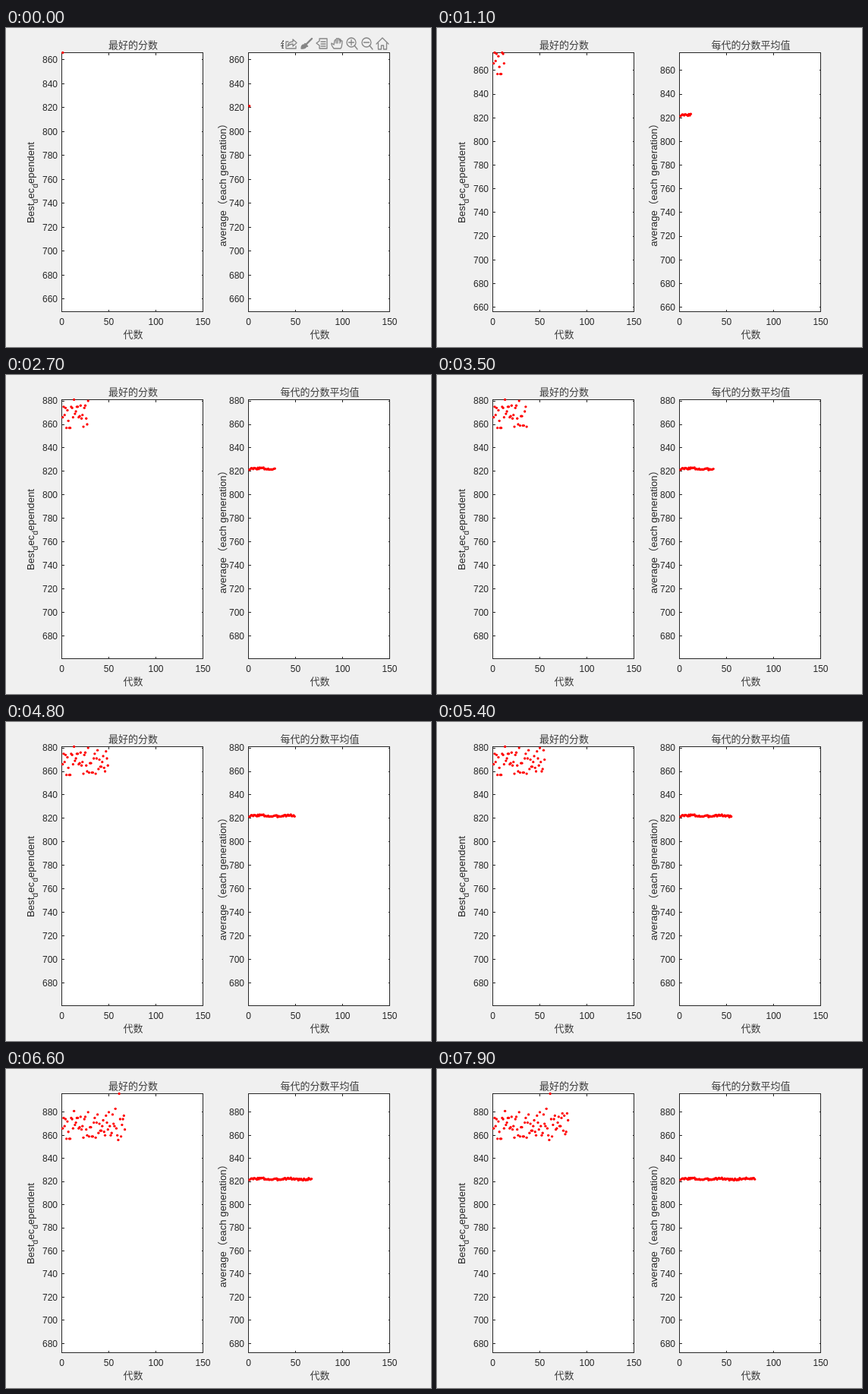
These frames come from a looping animation (560x420 px, 8 s). An HTML page:

```html
<!DOCTYPE html>
<html lang="zh">
<head>
<meta charset="utf-8">
<style>
  html, body { margin: 0; width: 100%; height: 100%; overflow: hidden; background: #f0f0f0; }
  svg { display: block; width: 560px; height: 420px; }
  text { font: 12px "Liberation Sans", "Noto Sans CJK SC", "Noto Sans CJK", sans-serif; fill: #262626; text-anchor: middle; }
  .cjk { font: 300 13px "Noto Sans CJK SC", "Noto Sans CJK", serif; fill: #3c3c3c; }
  .label { font-size: 13.2px; }
  .sub { font-size: 10.5px; }
  .tick { text-anchor: end; }
  .axis { fill: none; stroke: #262626; shape-rendering: crispEdges; }
  .icon { fill: none; stroke: #858585; stroke-width: 1.3; stroke-linejoin: round; stroke-linecap: round; }
</style>
</head>
<body>
<svg id="stage" viewBox="0 0 560 420">
  <g id="plots"></g>
  <g id="toolbar">
    <rect x="366" y="12" width="141" height="18" fill="#f0f0f0"/>
    <g class="icon">
      <path d="M372 18h-3v9h13v-3M371 24q1-6 7-6v-3l5 4.500-5 4.500v-3q-4 0-7 3"/>
      <path d="M403 14l-8 8M394 21l3 3" stroke-width="2.4"/>
      <path d="M393 22q-4 0-4 5 5 1 7-3z" fill="#858585"/>
      <path d="M413 14h10v13h-10v-4l-4-3 4-3zM415 18h6M415 21h6M415 24h6"/>
      <path d="M432 22l-3-2q-1 2 3 7h9q2-3 2-10-2-1-2 1v-3q-2-1-2 1v-2q-2-1-2 1v-1q-2-1-2 1v1q-2-1-2 1zM435 16v4M437 15v5M440 16v4"/>
      <path d="M459 23l4 5M451.500 19h7M455 15.500v7M479 23l4 5M471.500 19h7"/>
      <circle cx="455" cy="19" r="6"/>
      <circle cx="475" cy="19" r="6"/>
      <path d="M488 21l8-8 8 8M490.500 20v8h4v-5h3v5h4v-8"/>
    </g>
  </g>
</svg>
<script>
const LOOP = 8000, STEP = 100, TOOLBAR_END = 500;
const TOP = 32.5, HEIGHT = 341, WIDTH = 186, GENERATIONS = 150;
const COUNT = LOOP / STEP;
const LOWEST = 856, SPREAD = 24;

// Generations that set a new best score and so raise the axis limit.
const records = { 1: 866, 2: 875, 13: 881, 57: 883, 61: 896 };

function seededRandom(seed) {
  return () => {
    seed = (seed * 1664525 + 1013904223) % 4294967296;
    return seed / 4294967296;
  };
}

function makeBest() {
  const random = seededRandom(7);
  let record = 0;
  return Array.from({ length: COUNT }, (_, i) => {
    const spread = Math.min(SPREAD, record - LOWEST);
    const score = LOWEST + Math.round(random() * spread);
    if (!(i + 1 in records)) return score;
    return record = records[i + 1];
  });
}

function makeAverage() {
  const random = seededRandom(3);
  return Array.from({ length: COUNT }, (_, i) => {
    const wave = 0.5 * Math.cos((i - 11) / 30 * 2 * Math.PI);
    return 822.2 + wave + (random() - 0.5) * 1.8;
  });
}

const best = makeBest();
const panels = [
  {
    left: 73.5, labelX: 37, title: '最好的分数', data: best,
    label: 'Best<tspan class="sub" dy="5">d</tspan><tspan dy="-5">ec</tspan>' +
           '<tspan class="sub" dy="5">d</tspan><tspan dy="-5">ependent</tspan>'
  },
  {
    left: 319.5, labelX: 289.5, title: '每代的分数平均值', data: makeAverage(),
    label: 'average（each generation）'
  }
];

const plots = document.getElementById('plots');
const toolbar = document.getElementById('toolbar');

const text = (x, y, content, cls = '', extra = '') =>
  `<text x="${x}" y="${y}" class="${cls}" ${extra}>${content}</text>`;

function drawPanel({ left, labelX, title, data, label }, count, max) {
  const right = left + WIDTH, bottom = TOP + HEIGHT, min = max * 0.75;
  const center = left + WIDTH / 2 + 1;
  const px = g => left + g / GENERATIONS * WIDTH;
  const py = v => TOP + (max - v) / (max - min) * HEIGHT;
  let path = `M${left} ${TOP}H${right}V${bottom}H${left}Z`;
  let out = `<rect x="${left}" y="${TOP}" width="${WIDTH}" height="${HEIGHT}" fill="#fff"/>`;

  for (let g = 0; g <= GENERATIONS; g += 50) {
    const x = Math.floor(px(g)) + 0.5;
    path += `M${x} ${TOP}v3M${x} ${bottom}v-3`;
    out += text(px(g), 391, g);
  }
  for (let v = Math.ceil(min / 20) * 20; v <= max; v += 20) {
    const y = Math.floor(py(v)) + 0.5;
    path += `M${left} ${y}h3M${right} ${y}h-2`;
    out += text(left - 5.5, Math.round(py(v) + 4.3), v, 'tick');
  }
  out += `<path class="axis" d="${path}"/>`;
  out += text(center, 27, title, 'cjk');
  out += text(center, 408, '代数', 'cjk');
  out += text(labelX, 203.5, label, 'label', `transform="rotate(-90 ${labelX} 203.5)"`);
  for (let i = 0; i < count; i++) {
    out += `<circle cx="${px(i + 1).toFixed(2)}" cy="${py(data[i]).toFixed(2)}" r="1.65" fill="#f00"/>`;
  }
  return out;
}

let shown = 0;
function render(time) {
  const count = Math.floor(time / STEP) + 1;
  if (count === shown) return;
  shown = count;
  const max = Math.max(...best.slice(0, count));
  plots.innerHTML = panels.map(p => drawPanel(p, count, max)).join('');
  toolbar.style.display = time < TOOLBAR_END ? '' : 'none';
}

const start = performance.now();
function tick() {
  render((performance.now() - start) % LOOP);
  requestAnimationFrame(tick);
}
tick();
</script>
</body>
</html>
```
